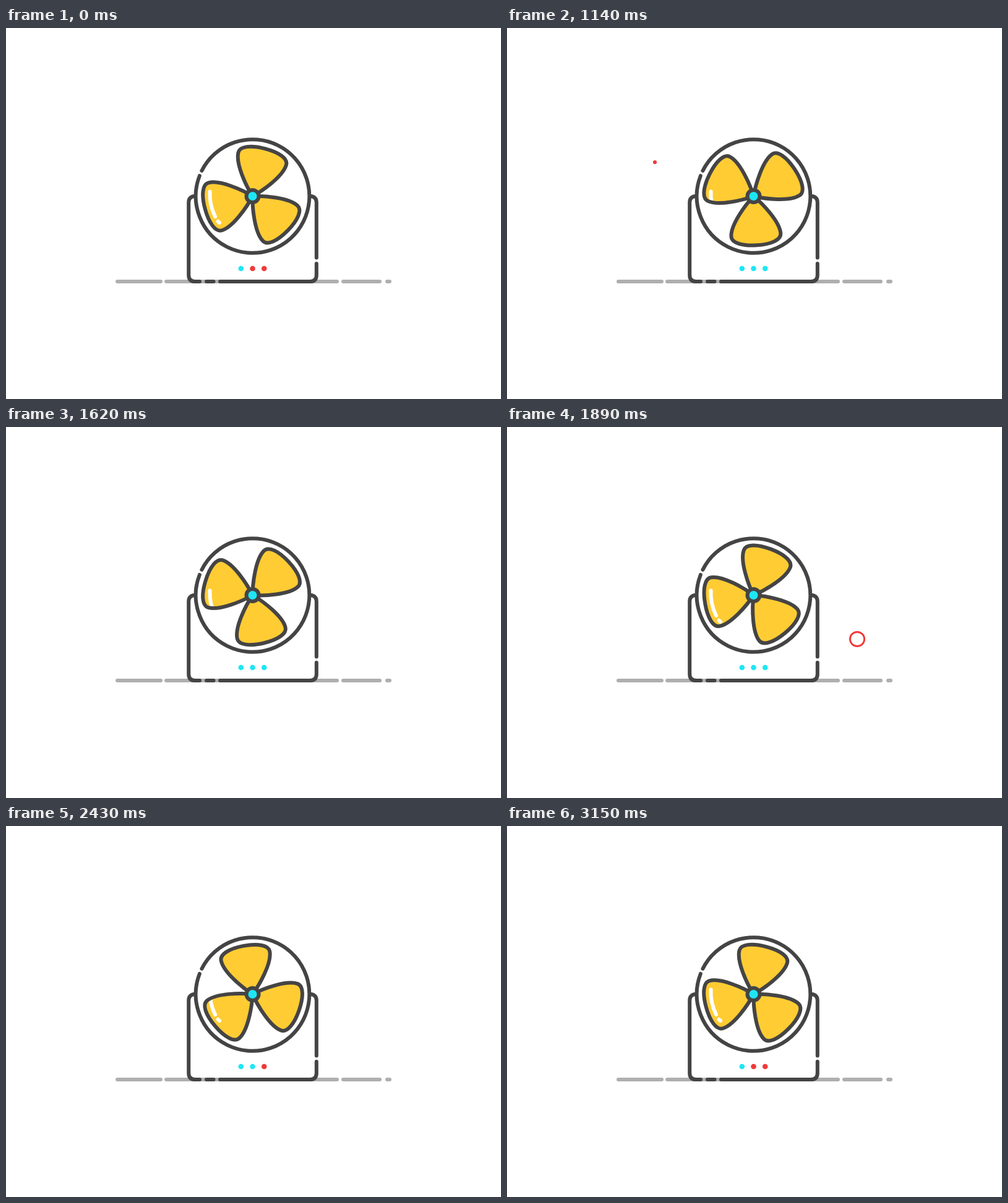
Animation of 800 by 600 pixels, one loop 3.6 s. Source, as an HTML page:

```html
<!DOCTYPE html>
<html lang="en">
<head>
<meta charset="utf-8">
<title>Desk fan</title>
<style>
  html, body { margin: 0; width: 100%; height: 100%; overflow: hidden; background: #fff; }
  svg { display: block; width: 800px; height: 600px; }
  .line { fill: none; stroke: #454445; stroke-width: 6; stroke-linecap: round; stroke-linejoin: round; }
  .ground { stroke: #b0afb0; }
  .shine { stroke: #fff; }
  .fill { fill: #ffcc33; }
</style>
</head>
<body>
<svg viewBox="0 0 800 600">
  <defs>
    <path id="blade" d="M0 0C14-13 40-44 40-63C40-73 24-79.5 0-79.5C-24-79.5-40-73-40-63C-40-44-14-13 0 0Z"/>
    <g id="blades">
      <use href="#blade" transform="rotate(14.5)"/>
      <use href="#blade" transform="rotate(134.5)"/>
      <use href="#blade" transform="rotate(254.5)"/>
    </g>
  </defs>

  <path class="line ground" d="M180 410.1H250M259 410.1H535M545 410.1H604M616 410.1H620"/>
  <path class="line" d="M304 272Q295.2 273.5 295.2 282V399.5Q295.2 410.1 306 410.1H313M324 410.1H335.5M346 410.1H491Q501.8 410.1 501.8 399.5V381M501.8 371.5V282Q501.8 273.5 493 272"/>
  <circle class="line" r="91.8" pathLength="360" stroke-dasharray="354.4 5.6" transform="translate(398.5 272) rotate(206.6)"/>

  <use class="fill spin" href="#blades"/>
  <path class="line shine" d="M329.5 264.5Q328.5 286 338 305M342.6 312.8L345 315"/>
  <use class="line spin" href="#blades"/>
  <circle class="line" cx="398.5" cy="272" r="10" style="fill:#1ee6f4"/>

  <g id="lamps">
    <circle cx="379.8" cy="389" r="4.3" fill="#1ee6f4"/>
    <circle cx="398.5" cy="389" r="4.3"/>
    <circle cx="417.2" cy="389" r="4.3"/>
  </g>
  <circle class="burst" cx="239" cy="217" pathLength="360"/>
  <circle class="burst" cx="566" cy="343" pathLength="360"/>
</svg>
<script>
const LOOP = 3600, STEP = 30;
const RED = '#f03a3a', CYAN = '#1ee6f4';

// time, angle, speed in degrees per ms
const SPIN = [
  [90, 0, 0], [660, 11.8, .038], [1140, 42, .14], [1620, 152.5, .32],
  [2190, 360, .39], [2670, 533, .25], [3150, 600, 0]
];

// switch to cyan, switch back to red
const LAMPS = [[270, 2607], [660, 2073]];
const FADE = 180;

const BURST_STARTS = [1020, 1650];
const BURST_TIME = 600;

const clamp = x => Math.min(1, Math.max(0, x));
const easeOut = x => 1 - (1 - x) ** 2;
const mix = (a, b, x) => a + (b - a) * x;

const spinners = document.querySelectorAll('.spin');
const lamps = [...document.querySelectorAll('#lamps circle')].slice(1);
const bursts = document.querySelectorAll('.burst');

function set(el, attrs) {
  for (const name in attrs) el.setAttribute(name, attrs[name]);
}

function angleAt(t) {
  if (t <= SPIN[0][0]) return 0;
  const i = SPIN.findIndex(k => t < k[0]);
  if (i < 0) return SPIN[SPIN.length - 1][1];
  const [t0, a0, v0] = SPIN[i - 1], [t1, a1, v1] = SPIN[i];
  const d = t1 - t0, x = (t - t0) / d;
  return mix(a0, a1, x * x * (3 - 2 * x)) +
    d * x * (1 - x) * (v0 * (1 - x) - v1 * x);
}

function drawLamp(el, [on, off], t) {
  const gap = Math.min(Math.abs(t - on), Math.abs(t - off));
  set(el, { fill: t >= on && t < off ? CYAN : RED, opacity: clamp(gap / FADE) });
}

// A dot pops up, opens into a ring, then the ring breaks into shrinking dashes.
function drawBurst(el, u) {
  const shown = u > 0 && u < BURST_TIME;
  el.style.display = shown ? '' : 'none';
  if (!shown) return;
  if (u <= 150) {
    set(el, { r: 3.1 * easeOut(clamp(u / 110)), fill: RED, stroke: 'none' });
    return;
  }
  const grow = easeOut(clamp((u - 150) / 260));
  const dash = 60 * clamp((BURST_TIME - u) / 190);
  set(el, {
    r: mix(3, 18, grow), fill: 'none', stroke: RED,
    'stroke-width': mix(5, 1.4, grow),
    'stroke-dasharray': dash < 60 ? `${dash} ${60 - dash}` : 'none',
    'stroke-dashoffset': dash / 2 - 30
  });
}

function draw(t) {
  const turn = `translate(398.5 272) rotate(${angleAt(t)})`;
  spinners.forEach(el => set(el, { transform: turn }));
  lamps.forEach((el, i) => drawLamp(el, LAMPS[i], t));
  bursts.forEach((el, i) => drawBurst(el, t - BURST_STARTS[i]));
}

const start = performance.now();
function tick() {
  const t = (performance.now() - start) % LOOP;
  draw(Math.floor(t / STEP) * STEP);
  requestAnimationFrame(tick);
}
draw(0);
requestAnimationFrame(tick);
</script>
</body>
</html>
```
